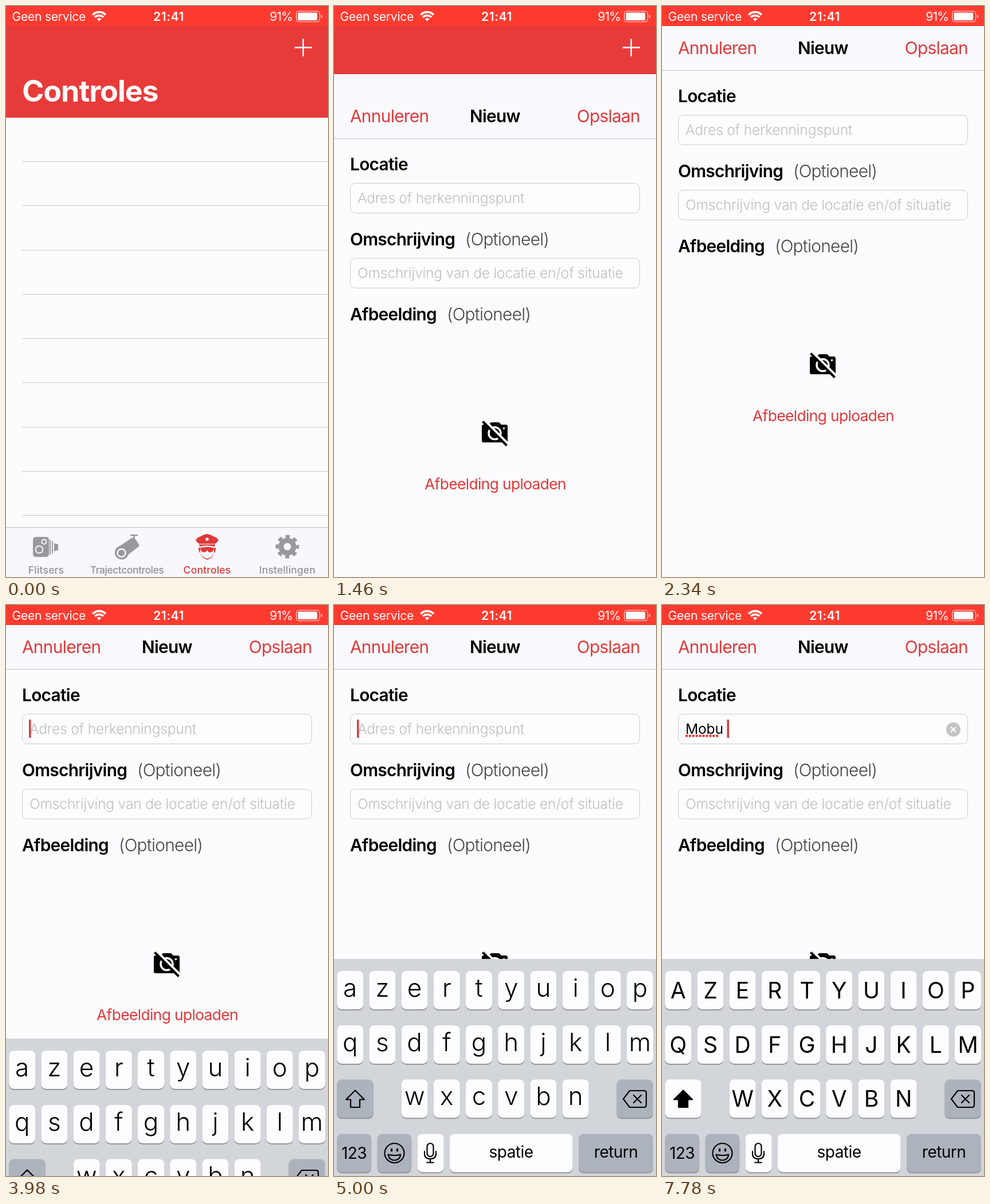
Recreate the animation shown at these times as an HTML page. Size 562 by 997 pixels, loop 8000 ms.

```html
<!DOCTYPE html>
<html lang="nl">
<head>
<meta charset="utf-8">
<title>Controles</title>
<style>
  html, body { margin: 0; width: 100%; height: 100%; overflow: hidden; background: #fcfcfe; }
  svg { display: block; }
  text { font-family: Inter, Roboto, "Liberation Sans", sans-serif; white-space: pre; }
  .mid { text-anchor: middle; }
  .end { text-anchor: end; }
  .status { font-size: 21px; fill: #fff; letter-spacing: -.01em; }
  .title { font-size: 52px; font-weight: 700; fill: #fff; letter-spacing: -.022em; }
  .body { font-size: 29.85px; letter-spacing: -.024em; }
  .bold { font-weight: 600; }
  .light { font-weight: 300; fill: #444; }
  .red { fill: #e0393a; }
  .field { font-size: 24.6px; letter-spacing: -.008em; }
  .hint { font-weight: 300; fill: #bfbfc3; }
  .upload { font-size: 26.3px; letter-spacing: -.023em; }
  .tab { font-size: 17.56px; font-weight: 500; fill: #929297; letter-spacing: .01em; }
  .tab.red { fill: #e0393a; }
  .lower { font-size: 44px; font-weight: 300; }
  .upper { font-size: 39px; }
  .word { font-size: 28px; letter-spacing: -.02em; }
  .line { fill: none; stroke: #000; stroke-width: 2.2; stroke-linejoin: round; stroke-linecap: round; }
</style>
</head>
<body>
<svg id="stage" width="562" height="997" viewBox="0 0 562 997">
  <defs>
    <filter id="shade" x="-40%" y="-20%" width="180%" height="140%">
      <feDropShadow dx="0" dy="2" stdDeviation="5" flood-color="#000" flood-opacity=".3"/>
    </filter>
  </defs>

  <g id="list">
    <rect width="562" height="997" fill="#fcfcfe"/>
    <rect width="562" height="195" fill="#e73b3a"/>
    <path id="plus" d="M503.5 72.5h30.5M518.7 57.3v30.5" stroke="#fff" stroke-width="2.5"/>
    <text class="title" x="28" y="167">Controles</text>
    <g id="rows" stroke="#c9c9c6"></g>
    <rect y="910" width="562" height="87" fill="#f8f8fc"/>
    <path d="M0 910.5H562" stroke="#bcbcbe"/>

    <g fill="#98989d">
      <rect x="47" y="927" width="28" height="35" rx="5"/>
      <path d="M76 932h2v26h-2zM80 934h2v22h-2zM84 938l7 2v10l-7 2z"/>
      <g fill="none" stroke="#f8f8fc" stroke-width="2"><circle cx="66.5" cy="935.5" r="4"/><circle cx="58" cy="949" r="6.3"/></g>
    </g>
    <g fill="#98989d">
      <path d="M191 948L219 929Q223 927 226 931L232 940Q233 943 230 945L211 960Z"/>
      <circle cx="202" cy="954.500" r="12"/>
      <circle cx="201.500" cy="955" r="7" fill="none" stroke="#f8f8fc" stroke-width="2.5"/>
      <path d="M217 924h13M223.500 924v7" stroke="#98989d" stroke-width="2.5"/>
    </g>
    <g fill="#e0393a">
      <path d="M331 933Q333 928 340 926Q347 922 351 922Q355 922 362 926Q369 928 371 933Q368 937 365 939H337Q334 937 331 933Z"/>
      <path d="M337 940h28l-1 4q-13-4-26 0z"/>
      <path d="M336 946q2-1 3 1v8q3 8 12 10 9-2 12-10v-8q1-2 3-1 0 7-3 9-2 9-12 12-10-3-12-12-3-2-3-9z"/>
      <path d="M339 946q12-3 24 0-1 8-7 8-3 0-5-4-2 4-5 4-6 0-7-8z"/>
      <circle cx="351" cy="931" r="2.800" fill="#f8f8fc"/>
    </g>
    <g fill="none" stroke="#98989d">
      <circle cx="491" cy="944" r="11" stroke-width="9"/>
      <circle cx="491" cy="944" r="17" stroke-width="7" stroke-dasharray="7 6.352" stroke-dashoffset="3.5"/>
    </g>
    <text class="tab mid" x="70" y="991">Flitsers</text>
    <text class="tab mid" x="211" y="991" style="letter-spacing:-.028em">Trajectcontroles</text>
    <text class="tab mid red" x="351" y="991">Controles</text>
    <text class="tab mid" x="491" y="991">Instellingen</text>
  </g>

  <g id="form">
    <rect width="562" height="997" fill="#fcfcfe"/>
    <rect width="562" height="112" fill="#fafafe"/>
    <path d="M0 112.5H562" stroke="#bdbdbf"/>
    <text class="body red" x="28" y="84">Annuleren</text>
    <text class="body bold mid" x="281" y="84">Nieuw</text>
    <text class="body red end" x="534" y="84">Opslaan</text>
    <text class="body bold" x="28" y="168">Locatie</text>
    <text class="body bold" x="28" y="299">Omschrijving</text>
    <text class="body light" x="229" y="299">(Optioneel)</text>
    <text class="body bold" x="28" y="430">Afbeelding</text>
    <text class="body light" x="197" y="430">(Optioneel)</text>
    <g fill="#fdfdff" stroke="#cbcbcb">
      <rect x="28.500" y="190.500" width="505" height="52" rx="9"/>
      <rect x="28.500" y="321.500" width="505" height="52" rx="9"/>
    </g>
    <text id="hint" class="field hint" x="41" y="225">Adres of herkenningspunt</text>
    <text class="field hint" x="41" y="356">Omschrijving van de locatie en/of situatie</text>
    <text id="typed" class="field" x="41" y="225"></text>
    <path id="squiggle" d="M43 228.500H102" stroke="#f03a30" stroke-width="4.600" stroke-linecap="round" stroke-dasharray="0 5.900"/>
    <rect id="cursor" y="200" width="3.500" height="32" rx="1" fill="#e0393a"/>
    <g id="clear">
      <circle cx="508.500" cy="217.500" r="12.500" fill="#c4c4c6"/>
      <path d="M504 213l9 9m0-9l-9 9" stroke="#fff" stroke-width="2.200"/>
    </g>
    <path d="M261 612h9l4-4h14l4 4h8q3 0 3 3v25q0 3-3 3h-39q-3 0-3-3v-25q0-3 3-3z"/>
    <circle cx="280.500" cy="627" r="10.500" fill="none" stroke="#fcfcfe" stroke-width="3.500"/>
    <circle cx="296.500" cy="618.500" r="1.800" fill="#fcfcfe"/>
    <path d="M262 603.500L305 646.500" stroke="#fcfcfe" stroke-width="4"/>
    <path d="M259.500 606.500L301.500 648.500" stroke="#000" stroke-width="4"/>
    <text class="upload red mid" x="281.500" y="725">Afbeelding uploaden</text>
  </g>

  <g id="keyboard">
    <rect y="618" width="562" height="379" fill="#d2d5da"/>
    <g id="keys"></g>
    <path id="arrow" class="line" d="M37 847.500L53 863.500H45V877H29V863.500H21Z"/>
    <path class="line" d="M516 848H541Q545 848 545 852V873Q545 877 541 877H516L505 862.500ZM523 856l13 13m0-13l-13 13"/>
    <g class="line">
      <circle cx="105.500" cy="957" r="17"/>
      <path d="M94.500 959.500Q105.500 962.500 116.500 959.500Q114.500 969.500 105.500 969.500Q96.500 969.500 94.500 959.500Z"/>
      <path d="M100.500 950v3m10-3v3" stroke-width="3.2"/>
      <rect x="162.500" y="940" width="11" height="23" rx="5.500"/>
      <path d="M158 954v4q0 9 10 9t10-9v-4M168 967v6M162 973.500h12"/>
    </g>
    <g id="popup">
      <path id="bubble" fill="#fdfdff" filter="url(#shade)"/>
      <text id="big" class="mid" y="-35"></text>
    </g>
  </g>

  <g id="statusbar">
    <rect width="562" height="35" fill="#ff3b30"/>
    <text class="status" x="10.500" y="26">Geen service</text>
    <g fill="none" stroke="#fff" stroke-width="3.600">
      <path d="M151.200 15.500a15.500 15.500 0 0 1 22.600 0M155 19.600a10.500 10.500 0 0 1 15 0"/>
      <path d="M158.500 22.500q4-3 8 0l-4 4.200z" fill="#fff" stroke="none"/>
    </g>
    <text class="status bold mid" x="284" y="26" style="letter-spacing:.03em">21:41</text>
    <text class="status end" x="500" y="26" style="letter-spacing:-.04em">91%</text>
    <rect x="506.800" y="9" width="40.500" height="18.500" rx="4.500" fill="none" stroke="#ffb0ab" stroke-width="1.600"/>
    <rect x="509.500" y="11.500" width="33.500" height="13.500" rx="2" fill="#fff"/>
    <path d="M549.500 15q3 1 3 3.300t-3 3.300z" fill="#ffb0ab"/>
  </g>
</svg>

<script>
const $ = id => document.getElementById(id);
const LOOP = 8000, OMEGA = 7.56;
const FORM_START = 976, KEYBOARD_START = 3697;
const ROW_Y = [639, 734, 828.5, 923.5];
const DARK = '#adb3bc', LIGHT = '#fdfdff';
const LETTERS = [['azertyuiop', 0], ['qsdfghjklm', 0], ['wxcvbn', 2]];

// [start, end] spans in which the picture stands still
const HOLDS = [[1220, 1320], [2060, 2160], [4440, 4540]];
const TYPED = [[6120, 'M'], [6490, 'Mo'], [6940, 'Mob'], [7250, 'Mobu'], [7780, 'Mobu ']];
const PRESSES = [[5970, 6120, 'M'], [6320, 6490, 'o'], [6850, 6940, 'b'], [7110, 7250, 'u']];

const keyAt = {};
const key = (x, y, w, fill, id = '') =>
  `<rect x="${x}" y="${y + 1.8}" width="${w}" height="67" rx="8.5" fill="#8b8d92"/>
   <rect id="${id}" x="${x}" y="${y}" width="${w}" height="67" rx="8.5" fill="${fill}"/>`;
const label = (cls, x, y, s) => `<text class="${cls} mid" x="${x}" y="${y}">${s}</text>`;

function buildKeys() {
  let caps = '', lower = '', upper = '';
  LETTERS.forEach(([row, skip], r) => [...row].forEach((c, i) => {
    const x = 5.2 + 56.2 * (i + skip), y = ROW_Y[r];
    keyAt[c] = [x, y];
    caps += key(x, y, 46, LIGHT);
    lower += label('lower', x + 23, y + 44.5, c);
    upper += label('upper', x + 23, y + 47.5, c.toUpperCase());
  }));
  const [, , y3, y4] = ROW_Y;
  caps += key(5.2, y3, 63.5, DARK, 'shift') + key(493.5, y3, 63.5, DARK)
    + key(5.2, y4, 60, DARK) + key(75.7, y4, 59.5, DARK) + key(145.7, y4, 46, LIGHT)
    + key(202, y4, 214.5, LIGHT, 'space') + key(427, y4, 130, DARK)
    + label('word', 35, 967, '123') + label('word', 309, 965, 'spatie') + label('word', 492, 965, 'return');
  $('keys').innerHTML = `${caps}<g id="lower">${lower}</g><g id="upper">${upper}</g>`;
}

function buildRows() {
  for (let i = 0; i < 9; i++) {
    const y = Math.round(271 + 77.26 * i) + .5;
    $('rows').innerHTML += `<path d="M28 ${y}H562"/>`;
  }
}

const show = (id, on) => $(id).style.display = on ? '' : 'none';
const shift = (id, x, y) => $(id).setAttribute('transform', `translate(${x} ${y})`);
const clamp = (v, lo, hi) => Math.min(hi, Math.max(lo, v));

// Critically damped spring: the part of the way still to go
function remaining(t, start) {
  const x = Math.max(0, t - start) / 1000 * OMEGA;
  return (1 + x) * Math.exp(-x);
}

function drawPopup(press) {
  show('popup', press);
  if (!press) return;
  const c = press[2], [x, y] = keyAt[c.toLowerCase()];
  const b = clamp(x - 22.5, 3, 468) - x;
  shift('popup', x, y);
  $('bubble').setAttribute('d', `M${b + 16} -110h59q16 0 16 16V-36C${b + 91} -14 46 -18 46 4
    V58q0 9 -9 9H9q-9 0 -9 -9V4C0 -18 ${b} -14 ${b} -36V-94q0 -16 16 -16z`);
  const big = $('big');
  big.textContent = c;
  big.setAttribute('x', b + 45.5);
  big.style.cssText = `font-size:${c === c.toLowerCase() ? 66 : 58}px;font-weight:300`;
}

function draw(now) {
  let t = now % LOOP;
  for (const [a, b] of HOLDS) if (t > a && t < b) t = a;

  const dim = clamp((t - 500) / 80, 0, 1) * clamp((1220 - t) / 300, 0, 1);
  $('plus').style.opacity = 1 - .7 * dim;
  // Whole pixels keep the thin lines sharp
  shift('form', 0, Math.round(997 * remaining(t, FORM_START)));
  show('form', t > FORM_START);
  shift('keyboard', 0, Math.round(379 * remaining(t, KEYBOARD_START)));
  show('keyboard', t > KEYBOARD_START);

  const text = TYPED.reduce((s, [at, value]) => t >= at ? value : s, '');
  const typed = $('typed');
  typed.textContent = text;
  show('hint', !text);
  show('clear', text);
  show('squiggle', text.endsWith(' '));
  show('cursor', t >= 3700);
  $('cursor').setAttribute('x', text ? 41 + typed.getComputedTextLength() : 40);

  const caps = t >= 5450 && t < 6120 || t >= 7780;
  show('upper', caps);
  show('lower', !caps);
  $('shift').setAttribute('fill', caps ? LIGHT : DARK);
  $('arrow').style.fill = caps ? '#000' : 'none';
  $('space').setAttribute('fill', t >= 7680 && t < 7780 ? DARK : LIGHT);
  drawPopup(PRESSES.find(([a, b]) => t >= a && t < b));
}

buildRows();
buildKeys();
const origin = performance.now();
(function tick() {
  draw(performance.now() - origin);
  requestAnimationFrame(tick);
})();
</script>
</body>
</html>
```
